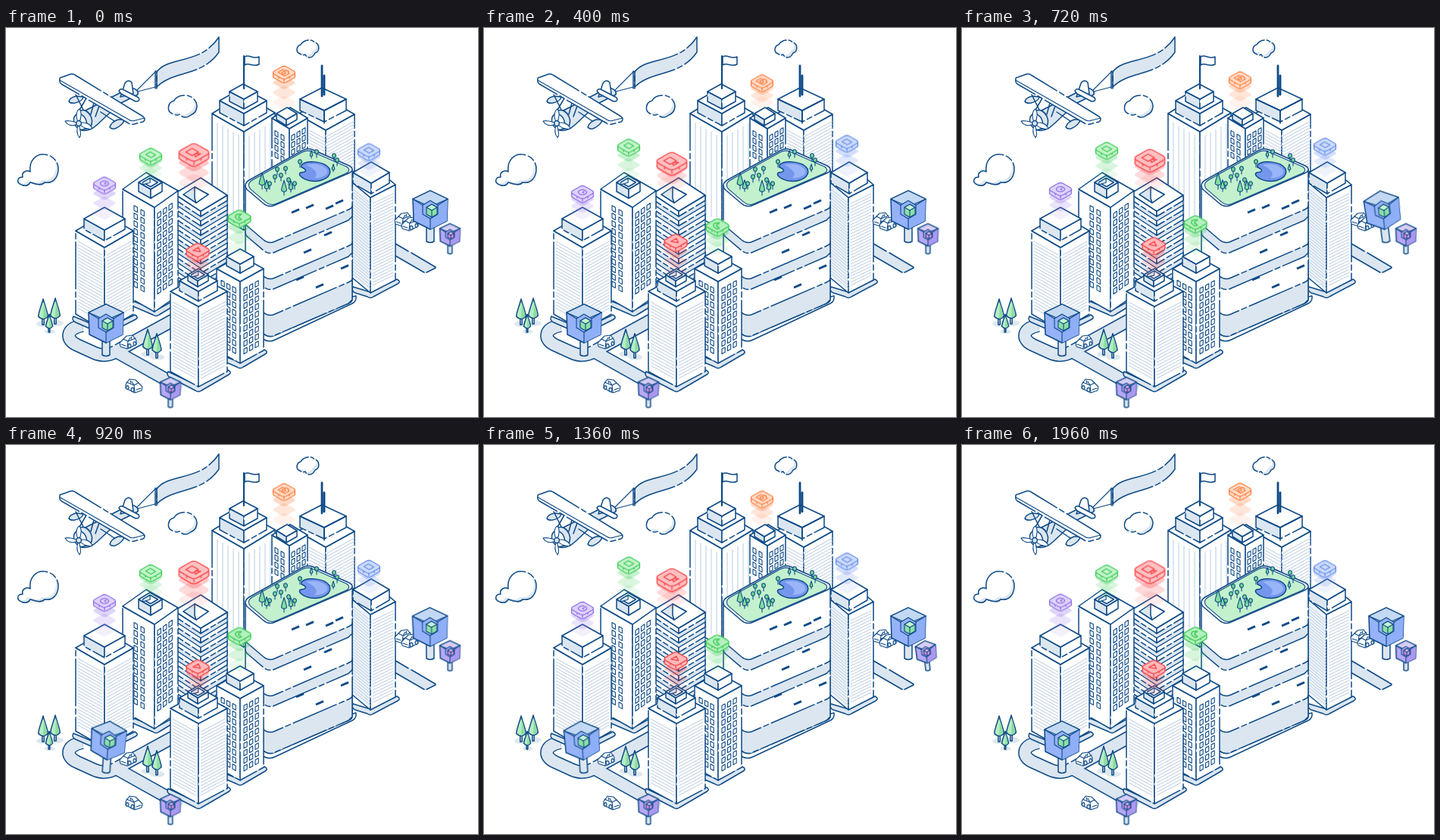
Animation, 623 px wide and 514 px high, one loop 2000 ms. Source, as an HTML page:

```html
<!DOCTYPE html>
<html lang="en">
<head>
<meta charset="utf-8">
<title>Isometric city</title>
<style>
html, body { margin: 0; width: 100%; height: 100%; overflow: hidden; background: #fff; }
svg { display: block; width: 623px; height: 514px; }
svg * { vector-effect: non-scaling-stroke; }
.ink { stroke: #0e4a86; stroke-width: 1.5; stroke-linejoin: round; stroke-linecap: round; }
.gap { stroke-dasharray: 62 4 7 4; }
.thin { stroke-width: 1.1; }
.hair { stroke: #b9cbdf; stroke-width: 1; fill: none; }
.float { animation: float .5s ease-in-out infinite alternate; }
@keyframes float { from { transform: translateY(var(--a)); } to { transform: translateY(var(--b)); } }
.sign { animation: 2s ease-in-out infinite; }
.sway-low { animation-name: sway-low; }
.sway-east { animation-name: sway-east; }
.sway-west { animation-name: sway-west; }
.sway-small { animation-name: sway-small; }
@keyframes sway-low {
  0%, 20.5%, 35.5%, 100% { transform: rotate(0); }
  25% { transform: rotate(6deg); }
  31% { transform: rotate(-6deg); }
}
@keyframes sway-east {
  0%, 28.5%, 60%, 100% { transform: rotate(0); }
  38% { transform: rotate(-7.5deg); }
  53% { transform: rotate(5deg); }
}
@keyframes sway-west {
  0%, 41%, 74%, 100% { transform: rotate(0); }
  48% { transform: rotate(5deg); }
  62% { transform: rotate(-7.5deg); }
}
@keyframes sway-small {
  0%, 50%, 77%, 100% { transform: rotate(0); }
  57% { transform: rotate(7deg); }
  68% { transform: rotate(-6deg); }
}
</style>
</head>
<body>
<svg id="city" viewBox="0 0 623 514" fill="none"></svg>
<script>
const PALE = '#dbe6f0', WHITE = '#fff', INK = '#0e4a86';
const out = [];
const add = s => out.push(s);

const path = (d, fill = 'none', cls = 'ink', more = '') =>
  `<path d="${d}" fill="${fill}" class="${cls}" ${more}/>`;
const draw = (...args) => add(path(...args));
const poly = (pts, fill, cls, more) => draw('M' + pts.join('L') + 'Z', fill, cls, more);
const down = ([x, y], h) => [x, y + h];
const group = (x, y, body, scale = 1) => `<g transform="translate(${x} ${y}) scale(${scale})">${body}</g>`;

// A block given by the left, front and right corners of its top face.
function block(l, f, r, h, left = WHITE, right = WHITE, top = WHITE) {
  const back = [l[0] + r[0] - f[0], l[1] + r[1] - f[1]];
  poly([l, f, down(f, h), down(l, h)], left, 'ink gap');
  poly([f, r, down(r, h), down(f, h)], right, 'ink gap');
  poly([l, f, r, back], top);
}

function stripes(a, b, from, to, step) {
  let d = '';
  for (let y = from; y <= to; y += step) d += `M${down(a, y)}L${down(b, y)}`;
  draw(d, 'none', 'hair');
}

function windows(a, b, xs, first, rows, pitch, w = 4.4, h = 6.4) {
  const slope = (b[1] - a[1]) / (b[0] - a[0]);
  let d = '';
  for (const x of xs)
    for (let i = 0; i < rows; i++)
      d += `M${x},${a[1] + (x - a[0]) * slope + first + i * pitch}l${w},${w * slope}v${h}l${-w},${-w * slope}z`;
  draw(d, WHITE, 'ink thin');
}

function plinth(l, f, r) {
  draw(`M${l}Q${l[0] - 3},${l[1] + 5} ${l[0] + 3},${l[1] + 8}L${f[0] - 4},${f[1] + 6}Q${f[0]},${f[1] + 9} ${f[0] + 4},${f[1] + 6}` +
    `L${r[0] + 1},${r[1] + 6}Q${r[0] + 6},${r[1] + 3} ${r}L${f}Z`, PALE);
}

function cloud(d, dash) {
  draw(d, PALE, '');
  add(`<g transform="translate(-3 -3)">${path(d, WHITE, '')}</g>`);
  draw(d, 'none', 'ink', `stroke-dasharray="${dash}"`);
}

function pine(x, y, s = 1) {
  add(group(x, y,
    path('M-9,-1a10,4 0 1 0 20,0a10,4 0 1 0 -20,0', '#dce8ee', '') +
    path('M-1.2,-9h2.4V0h-2.4z', WHITE) +
    path('M0,-34C2,-26 6,-17 6.3,-11Q0,-4 -6.3,-11C-6,-17 -2,-26 0,-34Z', '#b5edc2') +
    path('M1,-29C3,-22 5,-16 5,-11Q3,-8 0,-8Z', '#8edba3', ''), s));
}

function car(x, y, flip = 1) {
  add(`<g transform="translate(${x} ${y}) scale(${flip} 1)">` +
    path('M-11,1L-6,-4L-2,-8L6,-9L9,-5L11,-2V3L-1,9L-10,6Z', WHITE, 'ink thin') +
    path('M-6,-4L0,-1L3,-6M0,-1L-1,8M0,-1L10,-5M4,-4L5,-7M-9,3L-3,5', 'none', 'ink thin') +
    path('M0,5a2,2.6 0 1 0 4,0a2,2.6 0 1 0 -4,0M7,2a1.8,2.4 0 1 0 3.6,0a1.8,2.4 0 1 0 -3.6,0', PALE, 'ink thin') + '</g>');
}

function sky() {
  cloud('M20,207C13,204 15,197 22,197C20,190 28,187 32,190C30,175 40,166 50,167C63,168 70,178 69,188C68,199 61,206 51,204C46,210 36,205 32,204C29,209 24,209 20,207Z', '70 4 9 4');
  cloud('M219,113C212,110 213,98 222,96C226,88 241,86 248,94C255,101 252,112 244,115C238,120 232,118 229,114C226,116 222,115 219,113Z', '38 4 6 4');
  cloud('M388,34C382,32 383,24 389,22C393,15 404,14 407,19C414,20 415,31 408,33C404,41 397,40 395,35C393,36 390,36 388,34Z', '28 3 5 3');
}

function plane() {
  draw('M199,58C214,37 257,49 281,12V32C258,65 220,56 199,78Z', PALE, 'ink gap');
  draw('M198,57L170,85L197,78', 'none', 'ink thin');
  draw('M197,57V80M199,57V80');
  draw('M97,113L150,86L166,79Q176,82 174,88L150,100L120,128Q108,139 97,134Z', PALE);
  draw('M151,91L157,73Q161,67 166,72L168,87Z', WHITE);
  draw('M149,83Q151,79 156,82L175,92Q178,97 171,97L152,87Z', WHITE);
  draw('M83,97Q84,92 93,90L102,91Q101,97 91,99Q85,100 83,97Z', PALE);
  draw('M137,131Q139,124 148,121L156,121Q155,128 144,133Q139,134 137,131Z', PALE);
  draw('M92,88L104,112M107,91L96,110M143,123L125,111M116,99L112,114M123,103L118,117', 'none', 'ink', 'stroke-width="2"');
  draw('M71,67Q71,65 74,65L85,61Q88,60 91,62L181,117Q185,121 181,124L169,127Q165,128 162,126L73,74Q70,72 71,67Z', WHITE, 'ink gap');
  draw('M71,69L162,121Q166,124 171,122L183,119', 'none', 'ink thin');
  add('<ellipse cx="103" cy="121" rx="10" ry="13" transform="rotate(-24 103 121)" fill="#dbe6f0" class="ink"/>');
  add('<ellipse cx="98" cy="124" rx="8" ry="11" transform="rotate(-24 98 124)" fill="#fff" class="ink"/>');
  draw('M96,126C91,117 93,109 97,107C101,113 99,120 96,126C98,136 100,141 97,145C93,140 93,133 96,126C89,123 81,122 78,123C82,130 90,130 96,126C103,134 111,134 114,133C112,127 104,123 96,126', WHITE, 'ink thin');
  add('<circle cx="96" cy="126" r="3.4" fill="#dbe6f0" class="ink"/>');
}

function roads() {
  const d = 'M101,393C79,397 78,412 94,419L116,429Q131,436 146,427L228,382M148,429L232,476';
  add(`<path d="${d}" stroke="${INK}" stroke-width="18" stroke-dasharray="96 3 9 3"/><path d="${d}" stroke="${PALE}" stroke-width="15"/>`);
  draw('M514,284L568,317L553,324L514,301Z', PALE, '');
  draw('M514,285L531,295M535,297L567,316M514,301L552,323M555,323L567,317');
}

function flagTower() {
  const l = [272, 113], f = [314, 137], r = [355, 112];
  block(l, f, r, 130);
  let d = '';
  for (let i = 1; i < 6; i++) d += `M${272 + i * 7},${121 + i * 4}V250M${314 + i * 7},${146 - i * 4}V215`;
  draw(d, 'none', 'hair', 'style="stroke-width:2;stroke:#dbe6f0"');
  block([282, 96], [314, 113], [344, 96], 16, PALE);
  block([295, 84], [314, 94], [332, 84], 13, PALE);
  draw('M314,80V37', 'none', 'ink', 'style="stroke-width:2.2"');
  draw('M315,38C321,34 326,42 334,38V48C326,52 321,45 315,49Z', WHITE);
}

function backTowers() {
  let l = [385, 114], f = [422, 135], r = [460, 114];
  block(l, f, r, 75);
  stripes(f, r, 9, 72, 4.2);
  stripes([400, 123], f, 12, 60, 4.2);
  block([388, 94], [420, 109], [449, 94], 15, PALE);
  draw('M388,94L420,109L449,94M420,109V126', 'none');
  draw('M417,50V90M420,63V88', 'none', 'ink', 'style="stroke-width:2.8"');
  l = [351, 119]; f = [374, 133]; r = [398, 119];
  block(l, f, r, 70);
  windows(l, f, [355, 363], 14, 4, 9.5, 4);
  windows(f, r, [377, 384, 391], 11, 5, 9.5, 4);
  block([357, 113], [370, 121], [384, 113], 8, PALE);
}

function rimmedTop(l, f, r, h) {
  block(l, f, r, h, PALE);
  const back = [l[0] + r[0] - f[0], l[1] + r[1] - f[1]];
  const mid = [(l[0] + r[0]) / 2, (l[1] + r[1]) / 2];
  const inset = [l, f, r, back].map(p => p.map((v, i) => mid[i] + (v - mid[i]) * .64));
  poly(inset, WHITE);
  poly([inset[0], inset[3], down(inset[3], 6), down(inset[0], 3)], PALE, 'ink thin');
}

function slabTower() {
  const l = [222, 219], f = [257, 242], r = [292, 221];
  for (let i = 8; i >= 0; i--) {
    const y = i * 12.5;
    poly([l, f, r, down(r, 13), down(f, 13), down(l, 13)].map(p => down(p, y)), PALE, 'ink thin');
    block(down(l, y), down(f, y), down(r, y), 7);
  }
  poly([[234, 220], [249, 210], [267, 220], [251, 231]], PALE);
  poly([[249, 210], [267, 220], [251, 231], [249, 225]], WHITE);
}

function leftTowers() {
  let l = [154, 213], f = [196, 237], r = [227, 215];
  plinth([156, 356], [198, 373], [229, 356]);
  block(l, f, r, 138);
  windows(l, f, [169, 178], 13, 11, 10);
  windows(f, r, [200, 207.5, 215], 11, 11, 10);
  rimmedTop([175, 204], [191, 213], [206, 204], 12);
  l = [92, 268]; f = [130, 290]; r = [168, 268];
  plinth([89, 381], [130, 398], [170, 379]);
  block(l, f, r, 110);
  stripes([95, 270], [127, 288], 12, 104, 4.2);
  stripes([133, 288], [165, 270], 12, 104, 4.2);
  block([103, 252], [130, 267], [157, 252], 14, PALE);
}

// Front outline of the mall at depth d below its roof.
const mallEdge = d => `316,${208 + d}Q316,${212 + d} 320,${215 + d}L340,${232 + d}Q347,${238 + d} 355,${234 + d}L452,${192 + d}Q457,${190 + d} 457,${187 + d}`;
const mallBack = d => `457,${187 + d}Q457,${184 + d} 453,${182 + d}L405,${161 + d}Q398,${158 + d} 391,${162 + d}L321,${201 + d}Q316,${204 + d} 316,${208 + d}`;

function mall() {
  draw(`M312,388Q312,394 317,397L339,411Q347,416 355,412L457,364Q463,361 462,354Z`, WHITE);
  draw(`M${mallEdge(172)}V187L316,208Z`, WHITE, 'ink gap');
  for (const [a, b] of [[48, 62], [96, 110], [144, 172]]) {
    draw(`M${mallEdge(a)}V${187 + b}L${mallEdge(b).split('L').length ? `452,${192 + b}L355,${234 + b}Q347,${238 + b} 340,${232 + b}L320,${215 + b}Q316,${212 + b} 316,${208 + b}` : ''}Z`, PALE, 'ink gap');
  }
  draw(`M${mallEdge(0)}L${mallBack(0)}Z`, WHITE);
  add(`<g transform="translate(24.2 12) scale(.9375 .94)">${path(`M${mallEdge(0)}L${mallBack(0)}Z`, '#c3f1ce', 'ink thin')}</g>`);
  const slots = [[377, 244], [396, 238], [422, 239], [435, 232], [420, 274], [393, 297], [442, 318], [409, 343], [383, 333]];
  draw(slots.map(([x, y]) => `M${x},${y}l10,-4.4`).join(''), 'none', 'ink', 'style="stroke-width:3;stroke-linecap:butt"');
  draw('M390,181C397,174 421,176 427,186C431,197 417,204 402,202C391,200 384,193 389,191C398,190 397,187 390,184Z', '#7596ed');
  draw('M396,181C408,178 420,181 424,188C426,194 417,199 407,198C415,192 404,184 396,181Z', '#9ab5f7', '');
  const shrubs = [[355, 204], [369, 193], [358, 194], [381, 213], [363, 202], [388, 184], [410, 171], [433, 176], [437, 182], [348, 213], [373, 208]];
  shrubs.forEach(([x, y]) => draw(`M${x},${y}v-5m-2.4,-2.4a2.4,2.8 0 1 0 4.8,0a2.4,2.8 0 1 0 -4.8,0`, '#72d894', 'ink thin'));
  [[338, 213, .64], [344, 216, .45], [367, 221, .58], [376, 217, .45], [403, 172, .3], [432, 190, .3]].forEach(p => {
    add(group(p[0], p[1], path('M0,0V-9', 'none', 'ink thin') + path('M0,-34C2,-26 6,-17 6,-11Q0,-5 -6,-11C-6,-17 -2,-26 0,-34Z', '#82dda0', 'ink thin'), p[2]));
  });
}

function eastTower() {
  const l = [457, 204], f = [481, 224], r = [514, 207];
  plinth([458, 342], [481, 349], [516, 332]);
  block(l, f, r, 126, '#edf3f8');
  stripes(l, f, 8, 122, 4);
  stripes([484, 222], [511, 209], 10, 119, 4);
  block([458, 191], [482, 205], [506, 191], 14, PALE);
}

function frontTowers() {
  let l = [278, 318], f = [309, 335], r = [340, 318];
  plinth([279, 430], [309, 442], [341, 425]);
  block(l, f, r, 108);
  windows(l, f, [284, 291.5, 299], 12, 9, 10, 4.2);
  windows(f, r, [314, 321.5, 329], 12, 9, 10, 4.2);
  block([291, 302], [309, 312], [327, 302], 12, PALE);
  l = [217, 348]; f = [254, 368]; r = [292, 348];
  plinth([214, 454], [254, 473], [293, 452]);
  block(l, f, r, 106);
  stripes([220, 350], [251, 367], 12, 100, 4.2);
  stripes([257, 367], [289, 350], 12, 100, 4.2);
  block([229, 334], [254, 348], [279, 334], 13, PALE);
  rimmedTop([240, 326], [253, 334], [267, 326], 8);
}

function sign(x, y, cls, scale, [face, side, top, core, coreTop]) {
  const body =
    path('M-5,-22H5V-1Q0,2 -5,-1Z', PALE) +
    path('M-23,-57L0,-68L23,-57L22,-28L0,-17L-22,-28Z', face) +
    path('M0,-43L23,-57L22,-28L0,-17Z', side, '') +
    path('M-23,-57L0,-68L23,-57L0,-47Z', top, 'ink thin') +
    path('M-10,-49L0,-55L10,-49V-37L0,-31L-10,-37Z', face, 'ink thin') +
    path('M-5,-46L2,-50L9,-46V-37L2,-33L-5,-37Z', core, 'ink thin') +
    path('M-5,-46L2,-50L9,-46L2,-42Z', coreTop, 'ink thin') +
    path('M2,-42V-33M-23,-57L-10,-49M23,-57L10,-49M0,-31V-17', 'none', 'ink thin');
  add(group(x, y, `<g class="sign ${cls}">${body}</g>`, scale));
}

function tile(x, from, to, base, color, fill, glyph, scale = 1) {
  const iso = 'transform="matrix(.87 .5 -.87 .5 0 0)"';
  const plate = (f, more) => `<rect x="-9.5" y="-9.5" width="19" height="19" rx="4" ${iso} fill="${f}" ${more}/>`;
  const line = `stroke="${color}" stroke-width="1.4"`;
  const mover = (k, body) => {
    const at = y => y - 2.5 + (base - y) * k / 3;
    return `<g class="float" style="--a:${at(from)}px;--b:${at(to)}px"><g transform="scale(${scale})">${body}</g></g>`;
  };
  let body = '';
  for (let k = 3; k > 0; k--) body += mover(k, plate(color, `opacity="${[0, .3, .2, .11][k]}"`));
  body += mover(0,
    `<g transform="translate(0 5)">${plate(fill, line)}</g>` +
    `<path d="M-14.4,0V5H14.4V0" fill="${fill}"/><path d="M-14.4,0V5M14.4,0V5M-7,5V8M7,5V8M0,9V12" ${line}/>` +
    plate(fill, line) + `<path d="${glyph}" ${iso} ${line} stroke-linejoin="round" stroke-linecap="round"/>`);
  add(`<g transform="translate(${x} 0)">${body}</g>`);
}

const BLUE = ['#96b2f8', '#8faef8', '#c3d8f3', '#8de0a4', '#c4f3d0'];
const VIOLET = ['#b8a7f4', '#ab98ef', '#d6cdf6', '#dd8ee0', '#f0c0ef'];

sky();
plane();
roads();
flagTower();
backTowers();
slabTower();
eastTower();
leftTowers();
mall();
frontTowers();

pine(49, 392); pine(65, 391); pine(57, 402, .7);
pine(187, 432); pine(199, 436, .95);
car(161, 415); car(169, 473, -1); car(524, 253); car(533, 259);

sign(560, 283, 'sway-east', 1, BLUE);
sign(586, 298, 'sway-small', .58, VIOLET);
sign(132, 433, 'sway-west', 1, BLUE);
sign(217, 501, 'sway-low', .58, VIOLET);

const SQUARE = 'M-4,-3.5H4V3.5H-4Z';
const CAMERA = 'M-5,-3H-2L-1,-5H2L3,-3H5V4H-5ZM-2,.5a2,2 0 1 0 4,0a2,2 0 1 0 -4,0';
const VIDEO = 'M-5,-3H2V4H-5ZM2,0L5,-2.5V3.5L2,1';
const CLOCK = 'M-4.5,0a4.5,4.5 0 1 0 9,0a4.5,4.5 0 1 0 -9,0M0,-2.5V0H2';
const PHONE = 'M-5,-1C-4,4 0,5 4,5L5,2L2,1L1,2L-2,-1L-1,-2L-2,-5Z';
const PLAY = 'M-3,-4L4,0L-3,4Z';
tile(367, 61.5, 74, 101, '#ff8446', '#ffdcc8', CAMERA);
tile(191, 170, 157, 196, '#3fce58', '#c2f3ca', SQUARE);
tile(248, 167, 179.5, 207, '#f9474b', '#ffc0c1', VIDEO, 1.36);
tile(130, 208, 220.5, 247, '#9475e8', '#ddd2fa', CLOCK);
tile(479, 164, 152, 190, '#6c92ee', '#cbdafa', SQUARE);
tile(308, 252, 264.5, 293, '#3fce58', '#b5f0bf', PHONE, 1.03);
tile(253, 296, 283, 324, '#f9474b', '#ffb9ba', PLAY, 1.03);

document.getElementById('city').innerHTML = out.join('');
</script>
</body>
</html>
```
